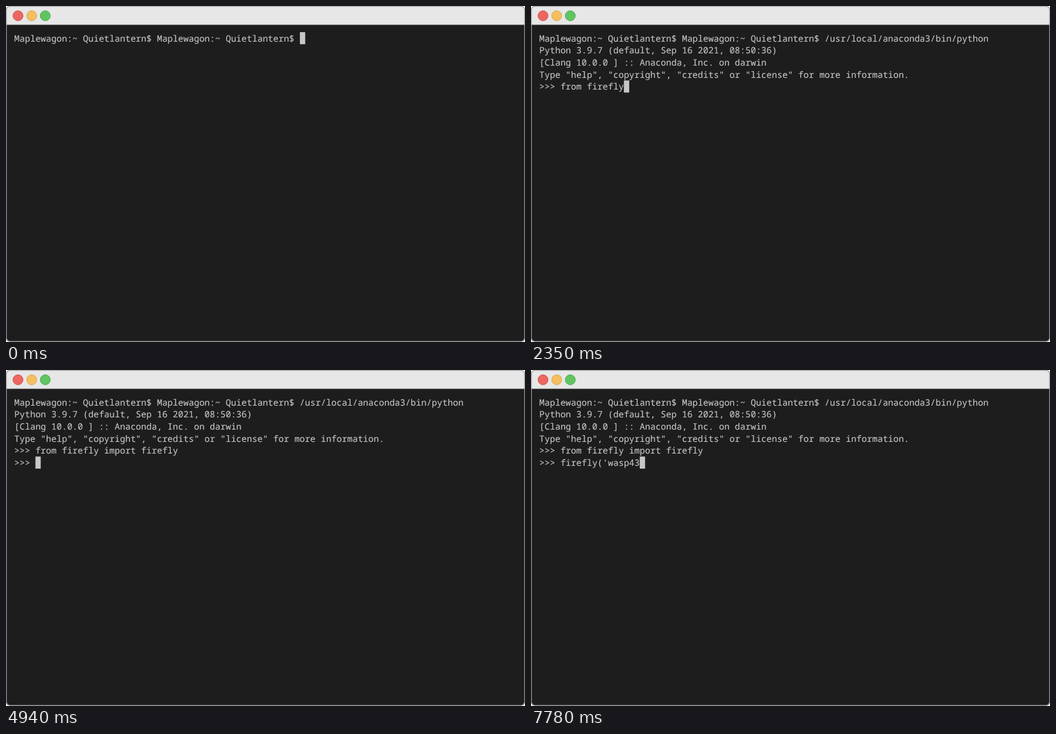
Write an HTML page that moves like this. It is 929 by 603 pixels and loops after 8000 ms.

```html
<!DOCTYPE html>
<html lang="en">
<head>
<meta charset="utf-8">
<title>Terminal session</title>
<style>
  html, body { margin: 0; width: 100%; height: 100%; overflow: hidden; background: #fff; }
  svg { display: block; width: 929px; height: 603px; }
  text {
    font-family: "Noto Sans Mono", "DejaVu Sans Mono", monospace;
    font-size: 15.78px;
    fill: #c3c3c3;
    stroke: #c3c3c3;
    stroke-width: .15px;
    white-space: pre;
    text-rendering: geometricPrecision;
  }
</style>
</head>
<body>
<svg viewBox="0 0 929 603">
  <defs>
    <clipPath id="frame"><rect width="929" height="602.5" rx="7"/></clipPath>
  </defs>
  <g clip-path="url(#frame)">
    <rect width="929" height="603" fill="#1d1d1d"/>
    <rect width="929" height="33" fill="#e7e7e7"/>
    <rect y="33" width="929" height="1.2" fill="#9c9c9c"/>
  </g>
  <rect x=".7" y=".6" width="927.6" height="601.2" rx="6.5" fill="none" stroke="#a0a0a0" stroke-width="1.3"/>
  <circle cx="21.5" cy="17.5" r="9" fill="#ec6762" stroke="#d04a45"/>
  <circle cx="46" cy="17.5" r="9" fill="#f5bf60" stroke="#d9a047"/>
  <circle cx="70.3" cy="17.5" r="9" fill="#60c561" stroke="#45a447"/>
  <g id="screen"></g>
  <rect id="cursor" width="9.5" height="21.7" fill="#c7c7c7"/>
</svg>
<script>
const LOOP = 8000;
const LEFT = 14.8, TOP = 46.9, COL = 9.468, ROW = 21.68, BASELINE = 16.8;
const SHELL = "Maplewagon:~ Quietlantern$ ";
const BANNER = `Python 3.9.7 (default, Sep 16 2021, 08:50:36)
[Clang 10.0.0 ] :: Anaconda, Inc. on darwin
Type "help", "copyright", "credits" or "license" for more information.
>>> `;

const steps = [];
const print = (time, text) => steps.push({ time, text });

// Spreads keystrokes evenly from the first time to the last.
function type(text, first, last) {
  [...text].forEach((key, i) =>
    print(first + (last - first) * i / (text.length - 1), key));
}

print(0, SHELL + SHELL);
print(300, "/usr/local/anaconda3/bin/python");
print(390, "\n");
print(520, BANNER);
print(830, "f");
type("rom", 1010, 1310);
type(" firefly", 1430, 2350);
type(" import ", 2490, 3500);
type("firefly\n", 3740, 4690);
print(4940, ">>> ");
type("firefly", 5190, 5980);
print(6360, "(");
type("'wasp", 6720, 7230);
type("43", 7700, 7780);

const screen = document.getElementById("screen");
const cursor = document.getElementById("cursor");
const rows = Array.from({ length: 6 }, (_, i) => {
  const row = document.createElementNS("http://www.w3.org/2000/svg", "text");
  row.setAttribute("x", LEFT);
  row.setAttribute("y", TOP + BASELINE + i * ROW);
  return screen.appendChild(row);
});

let shown = null;

function render(time) {
  const output = steps.filter(s => s.time <= time + 0.01).map(s => s.text).join("");
  if (output === shown) return;
  shown = output;
  const lines = output.split("\n");
  rows.forEach((row, i) => { row.textContent = lines[i] || ""; });
  cursor.setAttribute("x", LEFT + lines.at(-1).length * COL);
  cursor.setAttribute("y", TOP + (lines.length - 1) * ROW);
}

const start = performance.now();
function tick() {
  render((performance.now() - start) % LOOP);
  requestAnimationFrame(tick);
}
tick();
</script>
</body>
</html>
```
